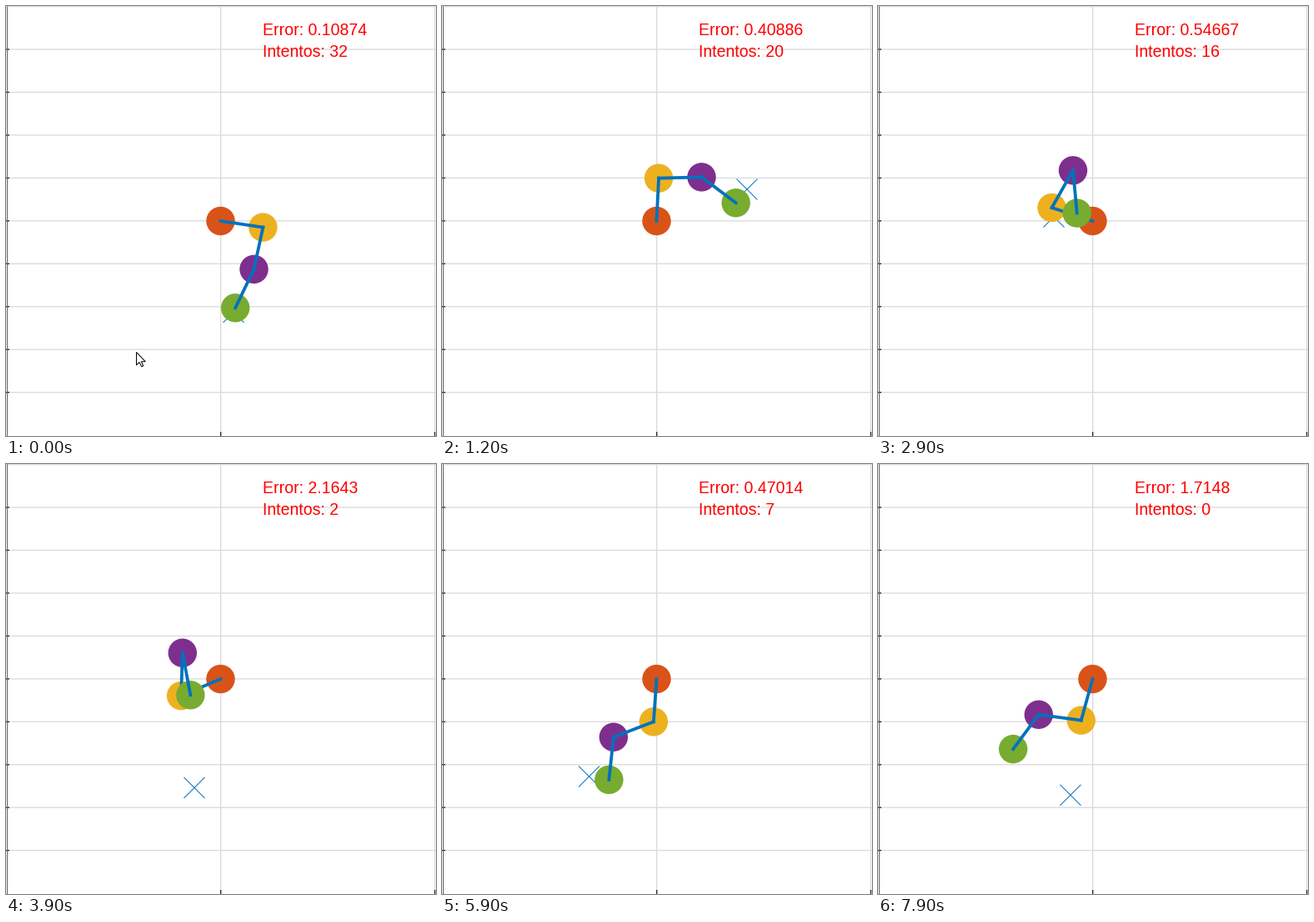
Recreate the animation shown at these times as a matplotlib script. Size 516x516 px, loop 8 s.

```python
import numpy as np
import matplotlib.pyplot as plt
from matplotlib.animation import FuncAnimation
from matplotlib.patches import Circle, Polygon

SIZE, FRAMES, INTERVAL = 516, 80, 100
BASE, UNIT = np.array([257.5, 258.0]), 51.45
BLUE, DARK, GRID = "#0072BD", "#262626", "#DADADA"
STEP_MS = 53.3              # time taken by one solver step
GAIN, TOL = 0.1, 0.1        # share of the error removed per step, goal tolerance

HEADINGS = (-8.5, -102.2, -115.7)   # link directions at the start, degrees
FIRST_TRY = 32                      # the loop opens late in the first reach

# when each goal appears (ms) and where (px)
GOALS = [
    (-FIRST_TRY * STEP_MS, 273.04, 367.414),
    (133, 366, 220),
    (2047, 211, 253),
    (3793, 226, 388.5),
    (5527, 176.5, 375),
    (6750, 159.7, 338),
    (7880, 231, 397.3),
]


def joints(q):
    """Joint positions in arm units, base first."""
    a = np.cumsum(q)
    links = np.column_stack([np.cos(a), np.sin(a)])
    return np.vstack([[0, 0], np.cumsum(links, axis=0)])


def to_px(p):
    return BASE + UNIT * np.asarray(p) * [1, -1]


def to_unit(px):
    return (np.asarray(px) - BASE) / UNIT * [1, -1]


def reach(q, goal):
    """Poses of a pseudo-inverse Jacobian search, one per step."""
    poses = [q]
    while len(poses) < 60:
        p = joints(q)
        miss = goal - p[3]
        if np.hypot(*miss) < TOL:
            break
        arm = p[3] - p[:3]
        jac = np.array([-arm[:, 1], arm[:, 0]])
        q = q + GAIN * np.linalg.pinv(jac) @ miss
        poses.append(q)
    return poses


def solve():
    """Chain the reaches: each one starts where the last one ended."""
    q = np.diff(np.radians(HEADINGS), prepend=0)
    legs, first = [], FIRST_TRY
    for start, *px in GOALS:
        goal = to_unit(px)
        poses = reach(q, goal)
        legs.append((start, goal, poses, first))
        q, first = poses[-1], 0
    return legs


LEGS = solve()


def state(ms):
    start, goal, poses, first = [leg for leg in LEGS if leg[0] <= ms][-1]
    n = round((ms - start) / STEP_MS) - first
    n = min(max(n, 0), len(poses) - 1)
    return goal, joints(poses[n]), first + n


fig = plt.figure(figsize=(SIZE / 72, SIZE / 72), dpi=72, facecolor="white")
ax = fig.add_axes([0, 0, 1, 1])
ax.set(xlim=(0, SIZE), ylim=(SIZE, 0))
ax.axis("off")


def stroke(x, y, color, width, z, cap="butt", snap=None):
    return ax.plot(x, y, color=color, lw=width, zorder=z, solid_capstyle=cap,
                   snap=snap)[0]


# grid, ticks and axis lines
for k in range(10):
    y = 0.6 + UNIT * k
    stroke([0, SIZE], [y, y], GRID, 1.3, 1, snap=False)
    if k:
        stroke([0, 4], [y, y], DARK, 1.3, 2, snap=False)
for x in (257.7, 514.6):
    stroke([x, x], [0, SIZE], GRID, 1.3, 1, snap=False)
    stroke([x, x], [511, SIZE], DARK, 1.3, 2, snap=False)
stroke([0.5, 0.5], [0, SIZE], "#606060", 1, 2)
stroke([0, SIZE], [515.5, 515.5], "#606060", 1, 2)

cross = [stroke([], [], BLUE, 1, 3) for _ in range(2)]

# each link lies over the joints at its two ends, later links on top
dots = [Circle((0, 0), 17.2, fc=c, ec="none", zorder=z) for c, z in
        (("#D95319", 4), ("#EDB120", 5), ("#7E2F8E", 7), ("#77AC30", 9))]
for dot in dots:
    ax.add_patch(dot)
links = [stroke([], [], BLUE, 3.8, z, "projecting") for z in (6, 8, 10)]

font = dict(family="Liberation Sans", size=19.5, color="red", va="baseline", zorder=11)
error_text = ax.text(308, 35, "", **font)
tries_text = ax.text(308, 61, "", **font)

ARROW = np.array([(0, 0), (0, 15.5), (3.6, 12), (6.2, 17.3), (8.3, 16.3),
                  (5.9, 11.2), (10.8, 11.2)])
pointer = Polygon(ARROW, closed=True, fc="white", ec="black", lw=1, zorder=12)
ax.add_patch(pointer)


def draw(i):
    goal, pts, n = state(i * INTERVAL)
    px = to_px(pts)
    gx, gy = to_px(goal)
    for line, s in zip(cross, (1, -1)):
        line.set_data([gx - 12.5, gx + 12.5], [gy - 12.5 * s, gy + 12.5 * s])
    for dot, p in zip(dots, px):
        dot.center = p
    for k, line in enumerate(links):
        line.set_data(px[k:k + 2, 0], px[k:k + 2, 1])
    error_text.set_text(f"Error: {np.hypot(*(goal - pts[3])):.5g}")
    tries_text.set_text(f"Intentos: {n}")
    pointer.set_xy(ARROW + [156.5 - 5.8 * i, 415.5 + 33 * i])
    pointer.set_visible(i < 4)
    return [*cross, *dots, *links, error_text, tries_text, pointer]


anim = FuncAnimation(fig, draw, frames=FRAMES, interval=INTERVAL, repeat=True,
                     repeat_delay=0, blit=False)
plt.show()
```
